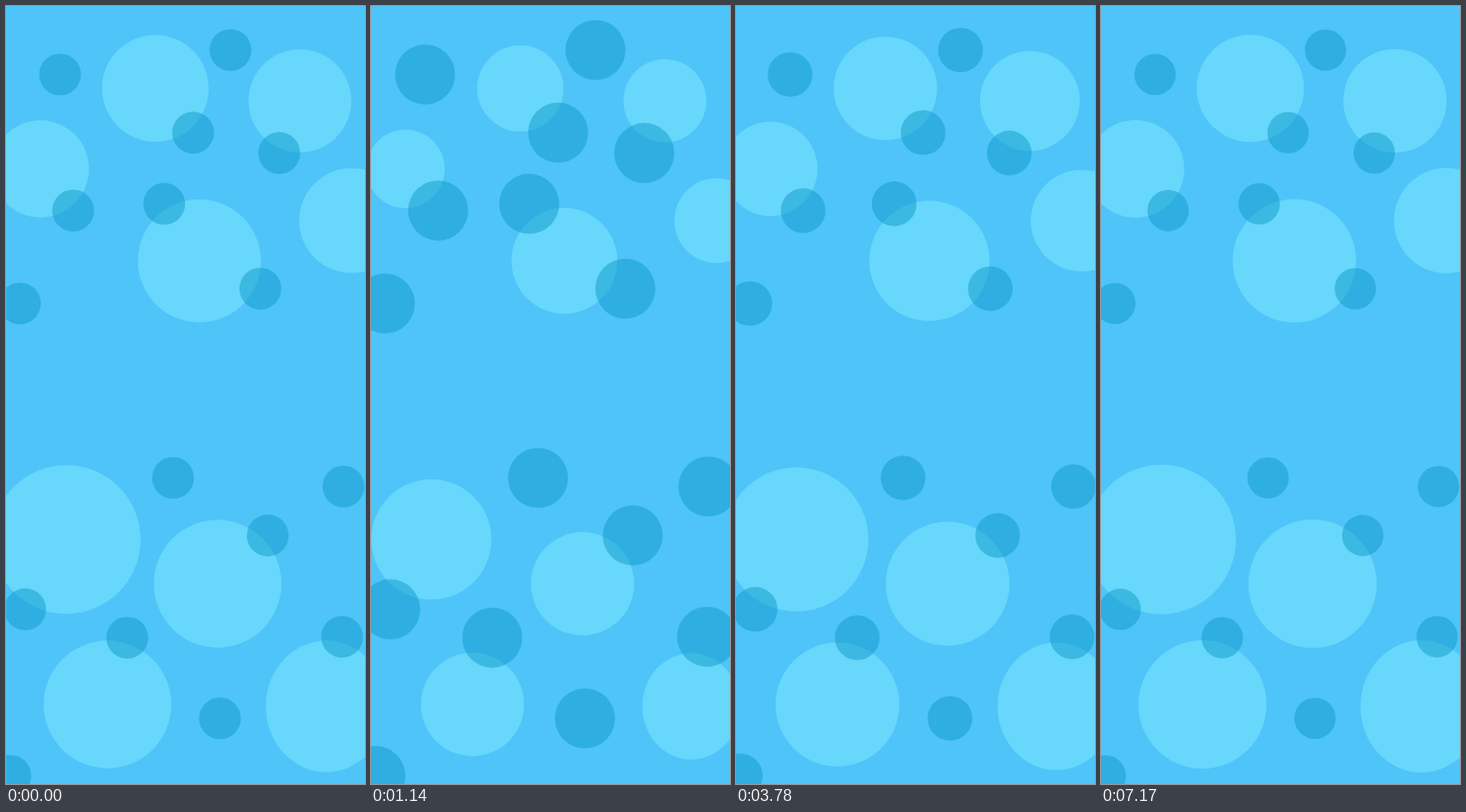
Animation of 375x812 px, one loop 7200 ms. Source, as an HTML page:

```html
<!DOCTYPE html>
<html lang="en">
<head>
<meta charset="utf-8">
<title>Bubbles</title>
<style>
  html, body { margin: 0; width: 100%; height: 100%; overflow: hidden; background: #4fc4f9; }
  svg { display: block; width: 375px; height: 812px; }
  #lights { fill: #67d7fb; }
  #dots { fill: #119cc9; fill-opacity: .5; }
</style>
</head>
<body>
<svg viewBox="0 0 375 812">
  <g id="lights"></g>
  <g id="dots"></g>
</svg>
<script>
const HALF = 1800;          // ms from one extreme size to the other
const PHASE = 30;           // ms already elapsed at load
const LIGHT_SHRINK = 0.7;
const DOT = { r: 21.6, end: 1.695 };
const RIM = 1.085;          // distance of a rim dot from its bubble's centre, in radii

// Large bubbles; "dots" are the angles (degrees) of the small dots on the rim.
const bubbles = [
  { x: 156, y: 86, r: 56, dots: [49.5] },
  { x: 307, y: 99, r: 54, dots: [111.6] },
  { x: 36, y: 170, r: 51, dots: [51.9] },
  { x: 202, y: 266, r: 64.5, end: 0.78, dots: [-121.7, 24.5] },
  { x: 361, y: 224, r: 55, dots: [] },
  { x: 63, y: 556.8, r: 78, dots: [120.5] },
  { x: 221, y: 603, r: 67, dots: [-43.9] },
  { x: 106, y: 729, r: 67, dots: [-73.5] },
  { x: 334.5, y: 731, r: 63.5, ry: 69, dots: [-76.1] }
];

const looseDots = [
  [56.5, 71.5], [234.5, 46], [14.5, 310.5], [174.5, 492.5],
  [352.5, 501.5], [223.5, 743.5], [4.5, 803.5]
];

const shapes = [];

function addShape(layer, x, y, rx, ry, end) {
  const el = document.createElementNS('http://www.w3.org/2000/svg', 'ellipse');
  el.setAttribute('cx', x);
  el.setAttribute('cy', y);
  document.getElementById(layer).appendChild(el);
  shapes.push({ el, rx, ry, end });
}

function addDot(x, y) {
  addShape('dots', x, y, DOT.r, DOT.r, DOT.end);
}

for (const { x, y, r, ry = r, end = LIGHT_SHRINK, dots } of bubbles) {
  addShape('lights', x, y, r, ry, end);
  for (const degrees of dots) {
    const a = degrees * Math.PI / 180;
    addDot(x + RIM * r * Math.cos(a), y + RIM * ry * Math.sin(a));
  }
}
looseDots.forEach(([x, y]) => addDot(x, y));

// All shapes follow one linear back-and-forth ramp.
function draw(time) {
  const p = ((time + PHASE) / HALF) % 2;
  const u = 1 - Math.abs(1 - p);
  for (const { el, rx, ry, end } of shapes) {
    const scale = 1 + (end - 1) * u;
    el.setAttribute('rx', rx * scale);
    el.setAttribute('ry', ry * scale);
  }
}

const start = performance.now();
function tick() {
  draw(performance.now() - start);
  requestAnimationFrame(tick);
}
tick();
</script>
</body>
</html>
```
